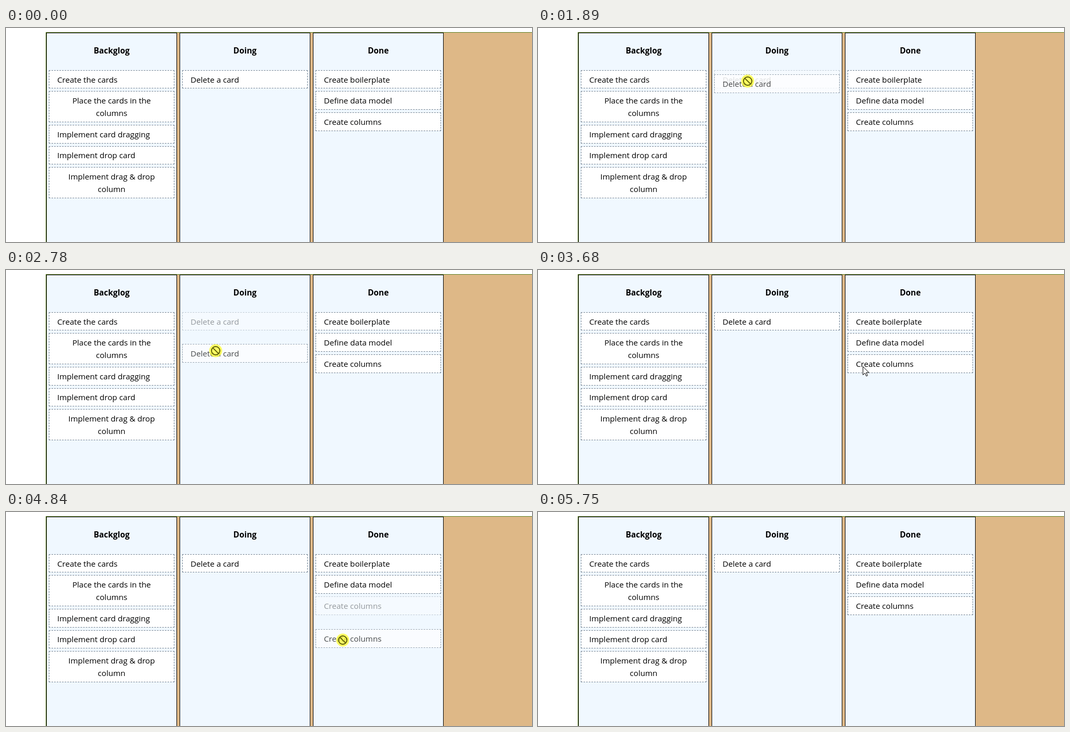
These frames come from a looping animation (1006 px wide and 411 px high, 6740 ms). An HTML page:

```html
<!DOCTYPE html>
<html lang="en">
<head>
<meta charset="utf-8">
<title>Card board</title>
<style>
  html, body { margin: 0; width: 100%; height: 100%; overflow: hidden; background: #fff; }
  body { position: relative; font: 15.15px/24px "Open Sans", "Noto Sans", sans-serif; color: #000; }
  #stage { position: absolute; left: 0; top: 0; width: 1006px; height: 411px; overflow: hidden; }
  #stage * { box-sizing: border-box; }
  .board { position: absolute; left: 76px; top: 8px; width: 940px; height: 420px;
    display: flex; gap: 5px; background: burlywood; border: 1px solid #5a7d1e; }
  .column { flex: none; width: 250px; height: 420px; padding: 0 4px;
    background: aliceblue; border: 1px solid #000; }
  .title { height: 70.8px; padding-top: 22px; text-align: center; font-weight: 700; font-size: 15.4px; }
  .card { position: relative; margin-bottom: 5px; padding: 4.8px 15px; white-space: pre;
    background: #fff; border: 1px dashed #708090; }
  .wrapped { text-align: center; }
  .ghost { position: absolute; left: 0; top: 0; width: 240px; opacity: .7; }
  #pointer { position: absolute; left: 0; top: 0; overflow: visible; }
</style>
</head>
<body>
<div id="stage"><div class="board"></div></div>
<script>
const LOOP = 6740;
const stage = document.getElementById('stage');
const board = stage.firstElementChild;

const columns = {
  Backglog: [
    'Create the cards',
    'Place the cards in the\ncolumns',
    'Implement card dragging',
    'Implement drop card',
    'Implement drag & drop\ncolumn'
  ],
  Doing: ['Delete a card'],
  Done: ['Create boilerplate', 'Define data model', 'Create columns']
};

function add(parent, className, text = '') {
  const box = document.createElement('div');
  box.className = className;
  box.textContent = text;
  parent.append(box);
  return box;
}

const cards = {};
for (const [title, texts] of Object.entries(columns)) {
  const column = add(board, 'column');
  add(column, 'title', title);
  for (const text of texts) {
    cards[text] = add(column, text.includes('\n') ? 'card wrapped' : 'card', text);
  }
}

// The pointer glides from rest to rest; each glide begins where the last one ended.
const appear = 310;
const leave = 5750;
const glides = [];
let rest = { x: 607, y: 361 };
function glide(start, end, x, y) {
  glides.push({ start, end, from: rest, to: { x, y } });
  rest = { x, y };
}
glide(appear, 620, 555, 257);
glide(860, 1100, 532, 241);
glide(1100, 1330, 203, 125);
glide(1330, 1510, 401, 94);
glide(1780, 2210, 401, 113);
glide(2260, 2780, 401, 155);
glide(2990, 3680, 621, 185);
glide(3680, 3900, 644, 183);
glide(4000, 4320, 644, 209);
glide(4370, 5010, 644, 250);
glide(5130, leave, 921, 411);

const easeOut = k => 1 - (1 - k) ** 1.7;

function pointerAt(time) {
  const { start, end, from, to } = glides.findLast(g => g.start <= time) || glides[0];
  const k = easeOut(Math.min(1, Math.max(0, (time - start) / (end - start))));
  return {
    x: Math.round(from.x + (to.x - from.x) * k),
    y: Math.round(from.y + (to.y - from.y) * k)
  };
}

function makeDrag(text, start, end) {
  const card = cards[text];
  const box = card.getBoundingClientRect();
  const ghost = add(stage, 'card ghost', text);
  const grab = pointerAt(start);
  return {
    card, ghost, start, end,
    press: start - 80,
    dx: Math.round(box.left) - grab.x,
    dy: Math.round(box.top) - grab.y
  };
}

const drags = [
  makeDrag('Delete a card', 1780, 2990),
  makeDrag('Create columns', 4000, 5130)
];

stage.insertAdjacentHTML('beforeend', `
  <svg id="pointer" width="1" height="1">
    <circle id="halo" r="12.5" fill="#ffff32" fill-opacity=".75"/>
    <path id="arrow" d="M.5 .5V16.5L4.3 12.9 6.9 18.8 9.3 17.8 6.8 12H12Z"
      fill="#fff" stroke="#000"/>
    <g id="blocked" fill="none" stroke="#5c5c08" stroke-width="1.9">
      <circle r="8"/><path d="M-5.6-5.6 5.6 5.6"/>
    </g>
  </svg>`);
const [pointer, halo, arrow, blocked] =
  ['pointer', 'halo', 'arrow', 'blocked'].map(id => document.getElementById(id));

const move = (element, x, y) => {
  element.style.transform = `translate(${x}px, ${y}px)`;
};
const show = (element, visible) => {
  element.style.visibility = visible ? 'visible' : 'hidden';
};

function render(time) {
  const { x, y } = pointerAt(time);
  for (const { card, ghost, start, end, dx, dy } of drags) {
    const active = time >= start && time < end;
    card.style.opacity = active ? .38 : 1;
    move(ghost, x + dx, y + dy);
    show(ghost, active);
  }
  const dragging = drags.some(d => time >= d.start && time < d.end);
  move(pointer, x, y);
  show(halo, drags.some(d => time >= d.press && time < d.end));
  show(arrow, time >= appear && time < leave && !dragging);
  show(blocked, dragging);
}

const startTime = performance.now();
function tick() {
  render((performance.now() - startTime) % LOOP);
  requestAnimationFrame(tick);
}
tick();
</script>
</body>
</html>
```
